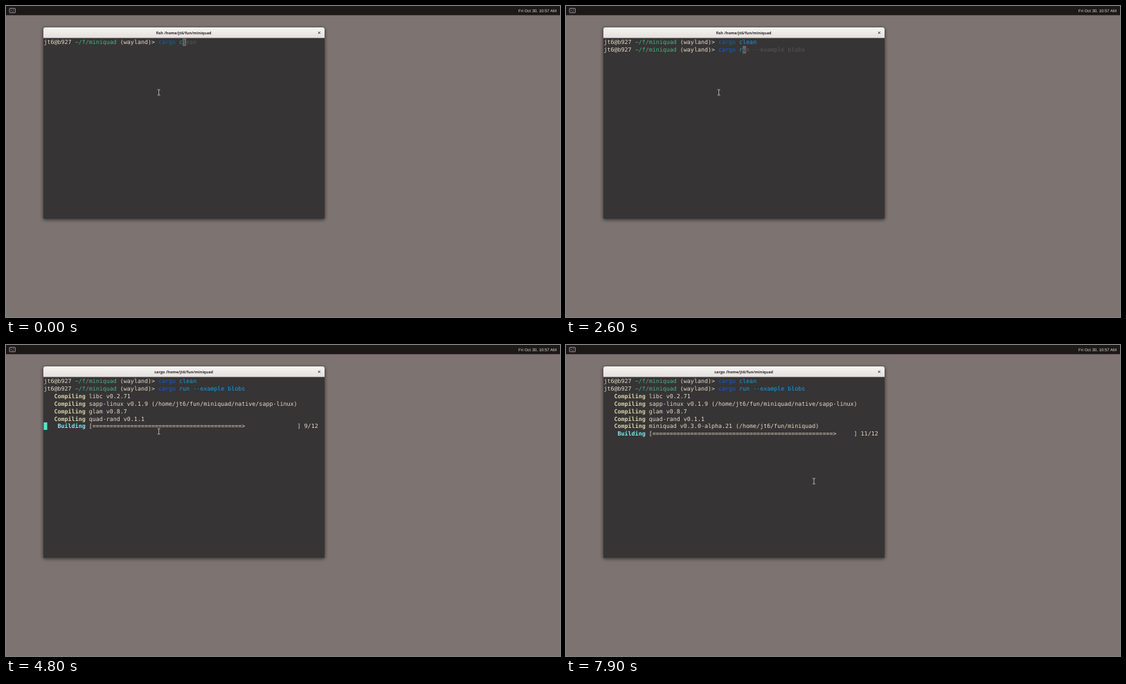
Recreate the animation shown at these times as an HTML page. Size 800 px wide and 450 px high, loop 8000 ms.

```html
<!DOCTYPE html>
<html lang="en">
<head>
<meta charset="utf-8">
<title>Terminal build</title>
<style>
  html, body { margin: 0; width: 100%; height: 100%; overflow: hidden; background: #7d7370; }
  svg { display: block; width: 100vw; height: 100vh; }
  text { text-rendering: geometricPrecision; white-space: pre; }
  #term text { font: 8.33px "DejaVu Sans Mono", monospace; }
  #term .b { font-weight: 700; }
  #title { font: 700 5.55px "Open Sans", sans-serif; fill: #2c2b2a; text-anchor: middle; }
  #clock { font: 6px "Liberation Sans", sans-serif; fill: #dedbd8; text-anchor: end; }
</style>
</head>
<body>
<svg viewBox="0 0 800 450" xmlns="http://www.w3.org/2000/svg">
  <defs>
    <linearGradient id="bar" x2="0" y2="1">
      <stop offset="0" stop-color="#f6f5f3"/>
      <stop offset="1" stop-color="#e3e0dc"/>
    </linearGradient>
    <filter id="blur" x="-10%" y="-10%" width="120%" height="120%">
      <feGaussianBlur stdDeviation="2.6"/>
    </filter>
  </defs>

  <rect width="800" height="450" fill="#7d7370"/>
  <rect width="800" height="13.3" fill="#1c1918"/>
  <g fill="none" stroke="#b5b2af" stroke-width=".8">
    <rect x="5" y="3.4" width="8.4" height="6.4" rx=".6"/>
    <path d="M6.8 5.2l1.2 1-1.2 1M9.6 5.4h2M8.6 8h2.6" stroke-width=".6"/>
  </g>
  <text id="clock" x="795" y="9">Fri Oct 30, 10:57 AM</text>

  <rect x="53.5" y="32" width="407" height="277.5" rx="3" fill="#000" opacity=".55" filter="url(#blur)"/>
  <path d="M54 46V34q0-3 3-3H457q3 0 3 3V46z" fill="url(#bar)"/>
  <rect x="54" y="46" width="406" height="261.8" fill="#363435"/>
  <path d="M54 46.2H460" stroke="#c9c5c0" stroke-width=".5"/>
  <text id="title" x="256.7" y="40.8"></text>
  <path d="M450.8 37.2l3 3m0-3l-3 3" stroke="#2c2b2a" stroke-width="1"/>

  <g id="term"></g>
  <g id="mouse" fill="none">
    <path d="M-2-4H-.6Q0-4 0-3.4Q0-4 .6-4H2M0-3.6V3.6M-2 4H-.6Q0 4 0 3.4Q0 4 .6 4H2" stroke="#222" stroke-width="1.9"/>
    <path d="M-2-4H-.6Q0-4 0-3.4Q0-4 .6-4H2M0-3.6V3.6M-2 4H-.6Q0 4 0 3.4Q0 4 .6 4H2" stroke="#d6d3d0" stroke-width=".9"/>
  </g>
</svg>

<script>
const LOOP = 8000, TICK = 50;
const CELL = 5.015, ROW = 10.83, LEFT = 54.5, TOP = 47;
const USER = "jt6", HOST = "b927", HOME = `/home/${USER}/fun/miniquad`;
const INK = "#e0dcc9", GREEN = "#4fae87", COMMAND = "#0b62d2", PARAM = "#109fe0",
      ERROR = "#e8120f", HINT = "#585655", CYAN = "#7cebef", LABEL = "#d6d2a8";
const PROMPT = 33;
const CLEAN = "cargo clean", RUN = "cargo run --example blobs";

// [time, typed so far, suggestion]
const firstKeys = [[0, "cargo c", CLEAN], [400, CLEAN, CLEAN]];
const secondKeys = [
  [1050, "", ""], [1700, "c", CLEAN], [1850, "ca", CLEAN], [2050, "car", CLEAN],
  [2150, "carg", CLEAN], [2250, "cargo", CLEAN], [2350, "cargo ", CLEAN],
  [2450, "cargo r", RUN], [2750, RUN, RUN]
];
const enters = [800, 3200];

const crates = [
  [3450, "libc v0.2.71"],
  [3500, `sapp-linux v0.1.9 (${HOME}/native/sapp-linux)`],
  [3550, "glam v0.8.7"],
  [3600, "quad-rand v0.1.1"],
  [6450, `miniquad v0.3.0-alpha.21 (${HOME})`]
];
const progress = [[3900, 5], [4100, 7], [4300, 8], [4500, 9], [6450, 10], [7750, 11]];
const pointer = [
  [4850, 220.7, 125], [5050, 250, 145], [5900, 338, 162.5], [6100, 359, 181.7],
  [6750, 360, 187.5], [7150, 359.5, 197], [7650, 359.5, 197], [7750, 358, 197]
];

const term = document.getElementById("term");
const title = document.getElementById("title");
const mouse = document.getElementById("mouse");

const latest = (list, t) => list.filter(e => e[0] <= t).pop();
const escapeText = s => s.replace(/&/g, "&amp;").replace(/</g, "&lt;").replace(/>/g, "&gt;");

function run(row, col, str, fill, bold) {
  if (!str) return "";
  const x = (LEFT + col * CELL).toFixed(2), y = (TOP + row * ROW + 8.4).toFixed(2);
  return `<text x="${x}" y="${y}" fill="${fill}"${bold ? ' class="b"' : ""}>${escapeText(str)}</text>`;
}

function block(row, col, fill) {
  return `<rect x="${LEFT + col * CELL}" y="${TOP + row * ROW}" width="${CELL}" height="${ROW}" fill="${fill}"/>`;
}

function commandLine(row, typed, hint, cursor) {
  const word = typed.split(" ")[0];
  const end = PROMPT + typed.length;
  const rest = hint.slice(typed.length);
  let out = run(row, 0, `${USER}@${HOST}`, INK) + run(row, 9, "~/f/miniquad", GREEN) +
    run(row, 22, "(wayland)>", INK) +
    run(row, PROMPT, word, word === "cargo" ? COMMAND : ERROR) +
    run(row, PROMPT + 6, typed.slice(6), PARAM);
  if (cursor) out += block(row, end, rest ? "#6a6866" : INK);
  if (rest[0] && rest[0] !== " ") out += run(row, end, rest[0], cursor ? "#363435" : HINT);
  // Start at a visible character so leading blanks never matter.
  const tail = rest.slice(1), pad = tail.length - tail.trimStart().length;
  return out + run(row, end + 1 + pad, tail.trimStart(), HINT);
}

function buildLine(row, done) {
  const count = ` ${done}/12`;
  const close = 77 - count.length + (done > 9 ? 0 : 0);
  const width = close - 14 + (78 - 77);
  const filled = Math.floor(width * done / 12);
  return run(row, 4, "Building", CYAN, true) +
    run(row, 13, "[" + "=".repeat(filled - 1) + ">", INK) +
    run(row, 14 + width, "]" + count, INK);
}

function cursorOn(t) {
  const keys = [...firstKeys, ...secondKeys.slice(1)].map(k => k[0]).concat(enters);
  const last = Math.max(...keys.filter(k => k <= t));
  return (t - last) % 1200 < 600;
}

function pointerAt(t) {
  const i = pointer.findIndex(p => p[0] > t);
  if (i === 0) return pointer[0].slice(1);
  if (i < 0) return pointer[pointer.length - 1].slice(1);
  const a = pointer[i - 1], b = pointer[i], k = (t - a[0]) / (b[0] - a[0]);
  return [a[1] + (b[1] - a[1]) * k, a[2] + (b[2] - a[2]) * k];
}

function draw(t) {
  const on = cursorOn(t);
  const first = latest(firstKeys, t), second = latest(secondKeys, t);
  let out = commandLine(0, first[1], first[2], on && t < 850);

  if (second) out += commandLine(1, second[1], second[2], on && t < 3400);
  else if (t >= 850 && on) out += block(1, 0, INK);

  if (t >= 3400) {
    const shown = crates.filter(c => c[0] <= t);
    const row = 2 + shown.length;
    const state = latest(progress, t);
    shown.forEach((c, i) => {
      out += run(2 + i, 3, "Compiling", LABEL, true) + run(2 + i, 13, c[1], INK);
    });
    if (state) out += buildLine(row, state[1]);
    if (on) out += block(row, 0, state ? "#58e6cc" : INK);
  }

  term.innerHTML = out;
  const busy = t >= 3200 || (t >= 800 && t < 1050);
  title.textContent = `${busy ? "cargo" : "fish"} ${HOME}`;
  mouse.setAttribute("transform", `translate(${pointerAt(t).join(" ")})`);
}

const start = performance.now();
let shownTick = -1;
function frame() {
  const tick = Math.floor(((performance.now() - start) % LOOP) / TICK);
  if (tick !== shownTick) draw((shownTick = tick) * TICK);
  requestAnimationFrame(frame);
}
frame();
</script>
</body>
</html>
```
